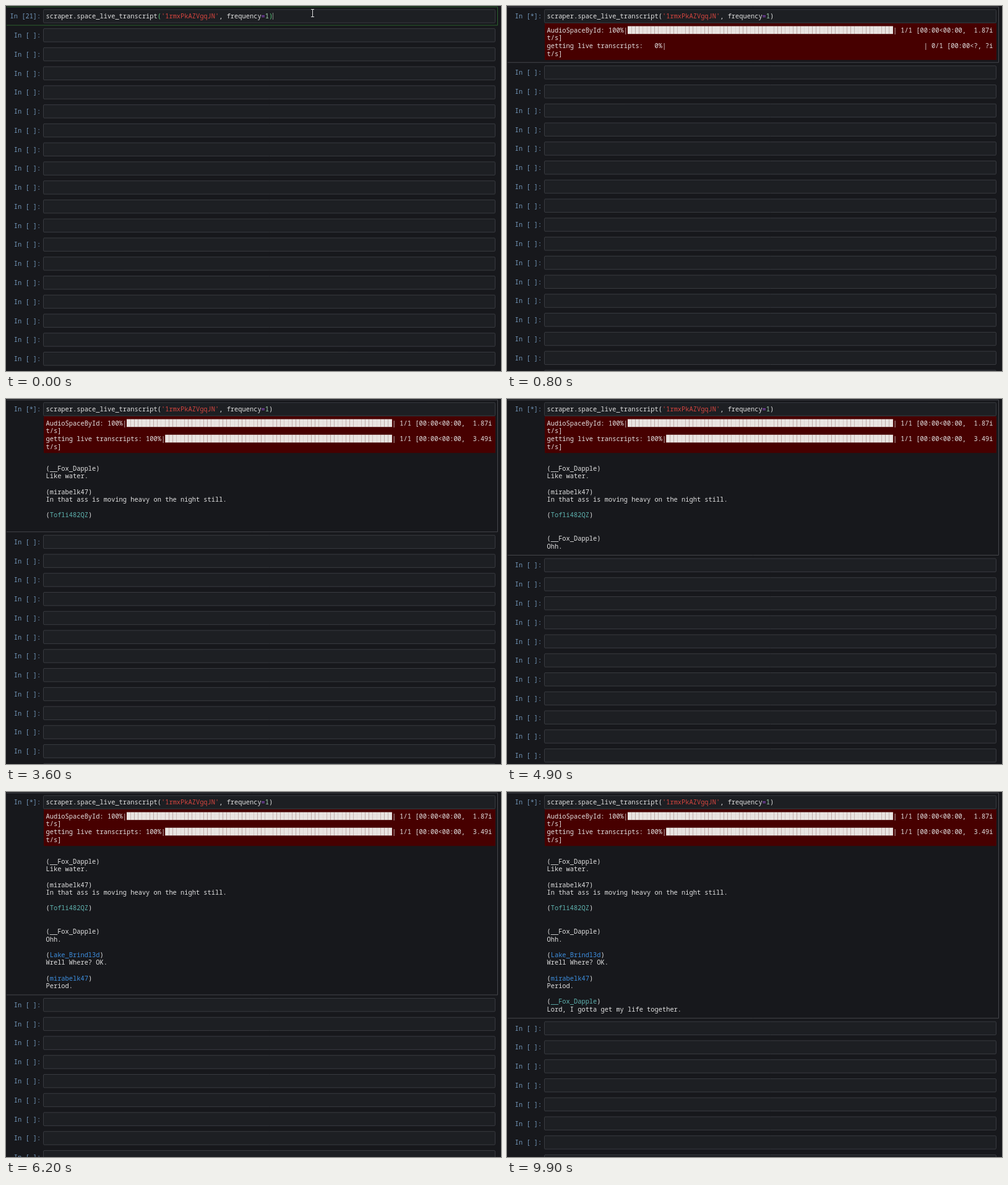
These frames come from a looping animation (800 px wide and 590 px high, 10 s). An HTML page with a canvas:

```html
<!DOCTYPE html>
<html lang="en">
<head>
<meta charset="utf-8">
<title>Live transcript notebook</title>
<style>
  html, body { margin: 0; width: 100%; height: 100%; overflow: hidden; background: #17181c; }
  canvas { display: block; }
</style>
</head>
<body>
<canvas id="stage" width="800" height="590"></canvas>
<script>
const ctx = document.getElementById('stage').getContext('2d');
const LOOP = 10000, FONT = 10.36, CHAR = FONT * 0.6, LINE = 12.58, ROW = 30.76;
const LEFT = 64.5, COLUMNS = 116;
const WHITE = '#e2e2e2', TEAL = '#5fb3b0', BLUE = '#3d8fe0', PROMPT = '#7296b9';
const RUN = 100, BAR_1 = 300, BAR_2 = 700, BAR_2_DONE = 1000;

// Each post takes three lines: a blank one, the speaker and the words.
const posts = [
  [1300, '__Fox_Dapple', WHITE, 'Like water.'],
  [1300, 'mirabelk47', WHITE, 'In that ass is moving heavy on the night still.'],
  [1300, 'Tofli482QZ', TEAL, ''],
  [3900, '__Fox_Dapple', WHITE, 'Ohh.'],
  [5000, 'Lake_Brindl3d', BLUE, 'Wrell Where? OK.'],
  [5900, 'mirabelk47', BLUE, 'Period.'],
  [6800, '__Fox_Dapple', TEAL, 'Lord, I gotta get my life together.'],
];

// Draws [text, colour] pairs side by side, centred on y.
function write(x, y, ...parts) {
  for (const [text, color = WHITE] of parts) {
    ctx.fillStyle = color;
    ctx.fillText(text, x, y + 3.8);
    x += text.length * CHAR;
  }
}

function rect(x, y, w, h, color) {
  ctx.fillStyle = color;
  ctx.fillRect(x, y, w, h);
}

// The frame of the active cell is open on its left side.
function activeFrame(bottom, color) {
  ctx.strokeStyle = color;
  ctx.beginPath();
  ctx.moveTo(1, 1.5);
  ctx.lineTo(794.5, 1.5);
  ctx.lineTo(794.5, bottom);
  ctx.lineTo(1, bottom);
  ctx.stroke();
}

function inputCell(y, label) {
  ctx.fillStyle = '#1d1f23';
  ctx.strokeStyle = '#393b40';
  ctx.beginPath();
  ctx.roundRect(60.5, y - 10.7, 730, 21.4, 1.5);
  ctx.fill();
  ctx.stroke();
  write(56.3 - label.length * CHAR, y, [label, PROMPT]);
}

function progress(y, title, done, rate) {
  const head = `${title}: ${done ? '100' : '  0'}%|`;
  const tail = done ? `| 1/1 [00:00<00:00,  ${rate}i` : '| 0/1 [00:00<?, ?i';
  const end = COLUMNS - tail.length;
  write(LEFT, y, [head]);
  write(LEFT + end * CHAR, y, [tail]);
  write(LEFT, y + LINE, ['t/s]']);
  if (!done) return;
  for (let i = head.length; i < end; i++) {
    rect(LEFT + i * CHAR, y - 6.4, CHAR - 0.05, 12.6, '#e9e4e1');
  }
}

function pointer(x, y) {
  rect(x, y - 5, 1, 11, '#ddd');
  rect(x - 2, y - 6, 5, 1, '#ddd');
  rect(x - 2, y + 6, 5, 1, '#ddd');
}

function draw(t) {
  const idle = t < RUN;
  const barLines = t < BAR_1 ? 0 : t < BAR_2 ? 2 : 4;
  const shown = posts.filter(post => t >= post[0]);
  const redHeight = barLines ? 8.9 + barLines * LINE : 0;
  let bottom = 31.1;
  if (barLines) bottom = 32 + redHeight;
  if (shown.length) bottom += 10.3 + shown.length * 3 * LINE;

  rect(0, 0, 800, 590, '#17181c');
  ctx.font = `${FONT}px "Noto Sans Mono", monospace`;
  ctx.lineWidth = 1;
  activeFrame(bottom, idle ? '#2c602e' : '#45464b');

  inputCell(16.5, idle ? 'In [21]:' : 'In [*]:');
  const paren = idle ? '#58c878' : WHITE;
  write(LEFT, 16.5,
    ['scraper.space_live_transcript'], ['(', paren], ["'1rmxPkAZVgqJN'", '#d6453f'],
    [', frequency'], ['=', '#a04fe0'], ['1', '#a5d3b0'], [')', paren]);
  if (idle) {
    rect(431, 11, 1, 11, '#7f8a80');
    pointer(495, 11);
  }

  if (barLines) {
    rect(61, 28, 730, redHeight, '#470000');
    progress(39, 'AudioSpaceById', t >= BAR_2, '1.87');
  }
  if (barLines > 2) progress(39 + 2 * LINE, 'getting live transcripts', t >= BAR_2_DONE, '3.49');

  shown.forEach(([, name, color, words], i) => {
    const y = 112 + i * 3 * LINE;
    write(LEFT, y, ['('], [name, color], [')']);
    write(LEFT, y + LINE, [words]);
  });

  for (let y = bottom + 16.2; y < 602; y += ROW) inputCell(y, 'In [ ]:');
}

const start = performance.now();
function tick() {
  draw((performance.now() - start) % LOOP);
  requestAnimationFrame(tick);
}
tick();
</script>
</body>
</html>
```
